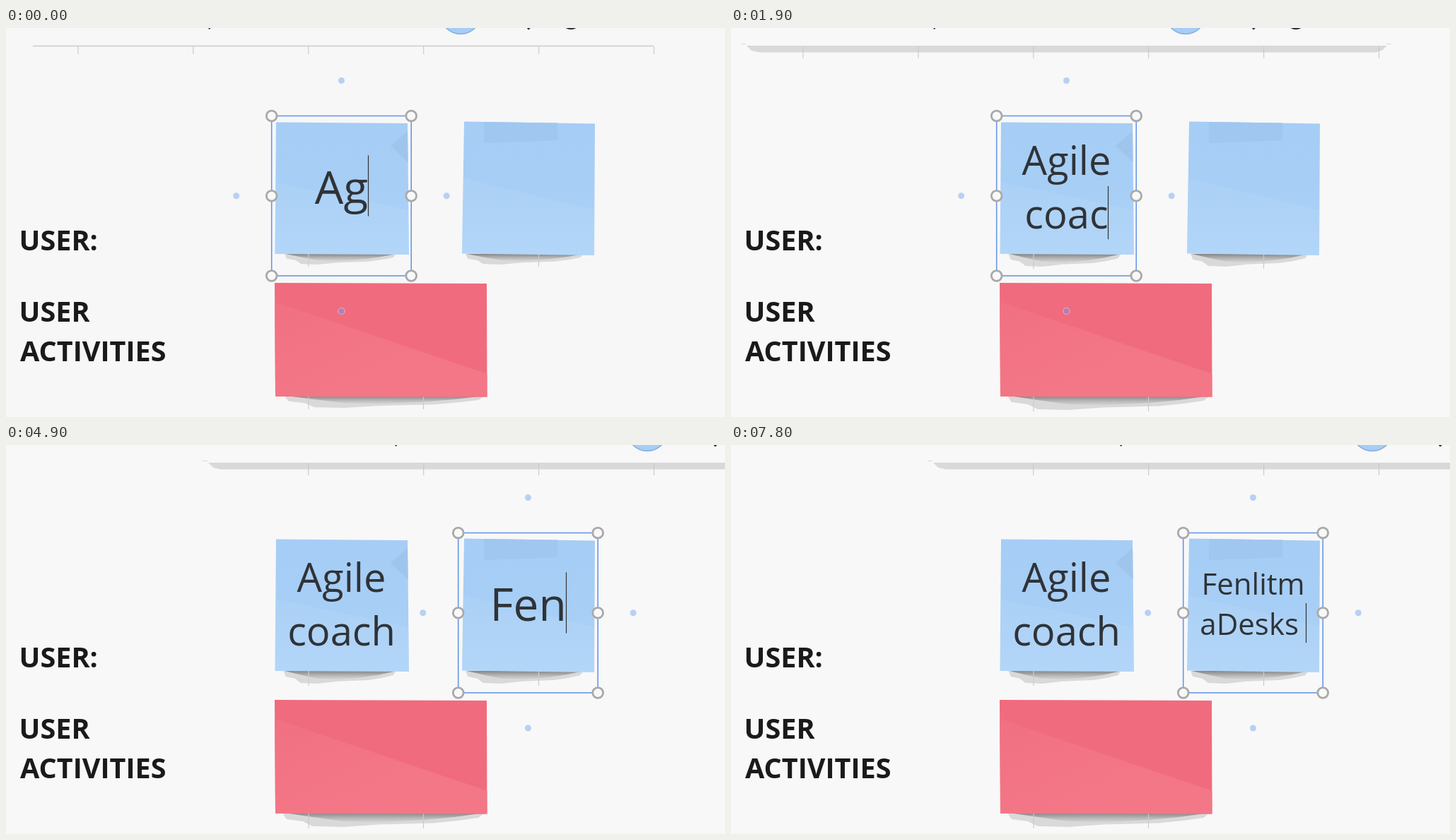
An HTML page with a canvas that plays this animation: 1017 by 551 pixels, repeating every 8 s.

```html
<!DOCTYPE html>
<html lang="en">
<head>
<meta charset="utf-8">
<title>Sticky notes</title>
<style>
html, body { margin: 0; width: 100%; height: 100%; overflow: hidden; background: #f8f8f8; }
canvas { display: block; width: 1017px; height: 551px; }
</style>
</head>
<body>
<canvas id="stage" width="1017" height="551"></canvas>
<script>
const ctx = document.getElementById('stage').getContext('2d');
const LOOP = 8000;
const LINE = 1.362, ASCENT = 1.069, MIDDLE = 224;
const INK = '#2f3337', BLUE_DOT = '#b8d0f4';
const SECOND = 264; // distance between the two blue notes

// [start, lines, font size, caret, top of the text block if not centred]
const firstNote = [
  [0, ['Ag'], 64, 1],
  [100, ['Agi'], 64, 1],
  [200, ['Agil'], 64, 1],
  [400, ['Agile'], 64, 1],
  [700, ['Agile '], 59, 1],
  [900, ['Agile', 'c'], 56, 1],
  [1000, ['Agile', 'co'], 56, 1],
  [1200, ['Agile', 'coa'], 56, 1],
  [1500, ['Agile', 'coac'], 56, 1],
  [2000, ['Agile', 'coac'], 56, 0],
  [2500, ['Agile', 'coac'], 56, 1],
  [2900, ['Agile', 'coach'], 56, 1],
  [3400, ['Agile', 'coach'], 56, 0]
];
const secondNote = [
  [0, [''], 64, 0],
  [4100, [''], 64, 1],
  [4400, ['F'], 64, 1],
  [4600, ['Fe'], 64, 1],
  [4900, ['Fen'], 64, 1],
  [5300, ['Fenl'], 64, 1],
  [5800, ['Fenli'], 64, 1],
  [6100, ['Fenlit'], 57, 1],
  [6400, ['Fenlitm'], 42, 1, 186],
  [6900, ['Fenlitm'], 42, 0, 186],
  [7300, ['Fenlitm'], 42, 1, 186],
  [7500, ['Fenlitm', 'aD'], 42, 1],
  [7600, ['Fenlitm', 'aDes'], 42, 1],
  [7700, ['Fenlitm', 'aDesks'], 42, 1],
  [7800, ['Fenlitm', 'aDesks '], 42, 1]
];

function poly(points, fill) {
  ctx.beginPath();
  points.forEach(([x, y]) => ctx.lineTo(x, y));
  ctx.closePath();
  ctx.fillStyle = fill;
  ctx.fill();
}

function line(x1, y1, x2, y2, color, width = 1) {
  ctx.beginPath();
  ctx.moveTo(x1, y1);
  ctx.lineTo(x2, y2);
  ctx.strokeStyle = color;
  ctx.lineWidth = width;
  ctx.stroke();
}

function circle(x, y, r, fill, stroke, width = 1) {
  ctx.beginPath();
  ctx.arc(x, y, r, 0, Math.PI * 2);
  if (fill) { ctx.fillStyle = fill; ctx.fill(); }
  if (stroke) { ctx.strokeStyle = stroke; ctx.lineWidth = width; ctx.stroke(); }
}

function gradient(x1, y1, x2, y2, ...colors) {
  const g = ctx.createLinearGradient(x1, y1, x2, y2);
  colors.forEach((c, i) => g.addColorStop(i / (colors.length - 1), c));
  return g;
}

function tick(x, top, bottom) {
  line(x, top, x, bottom, '#cbcbcb', 1.2);
}

function shadow(left, right, y, depth) {
  const width = right - left;
  const at = (u, v) => [left + width * u, y + depth * v];
  poly([at(0, 0), at(.02, .45), at(.1, .6), at(.15, .95), at(.3, 1), at(.48, .82),
    at(.75, .72), at(.87, .55), at(.97, .35), at(1, 0)], '#d9d9d9');
  poly([at(.01, 0), at(.15, .3), at(.3, .6), at(.48, .68), at(.7, .5), at(.85, .3), at(1, 0)],
    gradient(0, y, 0, y + depth * .7, '#858585', '#b5b5b5', '#d9d9d9'));
}

function note(corners, fill, sheen, sheenColor) {
  poly(corners, fill);
  ctx.save();
  ctx.beginPath();
  corners.forEach(([x, y]) => ctx.lineTo(x, y));
  ctx.clip();
  poly(sheen, sheenColor);
  ctx.restore();
}

function board(late) {
  const extra = late ? 3 : 0;
  const blue = gradient(0, 134, 0, 321, '#a6cdf5', '#a7cef5', '#afd4f7');

  shadow(394 - extra / 2, 552, 320, 15 + extra);
  shadow(650, 817, 320, 15 + extra);
  shadow(394 - extra, 677, 521, 17 + extra);
  [428, 753.5].forEach(x => tick(x, 320, 338 + extra));
  [428, 590.5].forEach(x => tick(x, 522, late ? 543 : 540));

  note([[382, 133.5], [568, 135], [570, 321], [380.5, 320]], blue,
    [[380, 218], [570, 258], [571, 322], [380, 322]], 'rgba(190,220,250,.2)');
  poly([[544, 167], [568, 146], [568.7, 190]], '#9fc5ed');

  note([[648, 132.5], [833, 135.5], [832, 322], [645, 319.5]], blue,
    [[644, 212], [833, 258], [833, 323], [644, 323]], 'rgba(190,220,250,.2)');
  poly([[676, 133], [780, 134.5], [780.5, 159], [740, 161], [676, 163]], '#a0c7f0');

  note([[380, 361], [680, 362], [680.5, 522.5], [381, 522]], '#f06b7e',
    [[380, 388], [681, 490], [681, 523], [380, 523]],
    gradient(380, 400, 440, 530, '#f17183', '#f37787'));
}

function labels() {
  ctx.font = 'bold 39.6px "Open Sans", sans-serif';
  ctx.fillStyle = '#1a1a1a';
  ctx.fillText('USER:', 18.5, 315);
  ctx.fillText('USER', 18.5, 416);
  ctx.fillText('ACTIVITIES', 20, 471.5);
}

function toolbar(dx, late) {
  ctx.save();
  ctx.translate(dx, 0);
  if (late) {
    poly([[22, 25], [928, 25], [922, 31], [912, 34.5], [40, 34.5], [29, 32]], '#d9d9d9');
    line(14, 22.5, 21, 22.5, '#d9d9d9');
    line(927, 22.5, 934, 22.5, '#d9d9d9');
  } else {
    line(38, 25.5, 916, 25.5, '#cbcbcb', 1.3);
  }
  line(289, -1, 287, 1.5, INK, 2);
  circle(643, -20, 28.5, '#a6cdf5', '#86add9', 1.4);
  line(742, -2, 738, 1.5, INK, 3);
  ctx.beginPath();
  ctx.ellipse(799, -5, 9, 6, 0, 0, Math.PI);
  ctx.strokeStyle = INK;
  ctx.lineWidth = 2.5;
  ctx.stroke();
  ctx.restore();

  for (let i = 0; i < 6; i++) {
    const x = 102 + i * 162.9;
    if (x > dx + 25) tick(x, 26, late ? 43 : 37);
  }
}

function selection(dx) {
  const left = 375.7 + dx, right = 573.2 + dx, top = 124.5, bottom = 351;
  const center = (left + right) / 2, middle = 237.8;
  ctx.strokeStyle = '#6796e8';
  ctx.lineWidth = 1.6;
  ctx.strokeRect(left, top, right - left, bottom - top);
  for (const x of [left, right])
    for (const y of [top, middle, bottom]) circle(x, y, 7.4, '#f8f8f8', '#a9a9a9', 2.8);

  circle(center, 74.5, 4.5, BLUE_DOT);
  circle(left - 50, middle, 4.5, BLUE_DOT);
  circle(right + 50, middle, 4.5, BLUE_DOT);
  if (dx) circle(center, 401, 4.5, BLUE_DOT);
  else circle(center, 401, 4.5, '#b57cb6', '#dcaed0', 1.2);
}

function typed(steps, t, center) {
  const [, lines, size, caret, blockTop] = steps.filter(s => s[0] <= t).pop();
  const top = blockTop || MIDDLE - lines.length * size * LINE / 2;
  ctx.font = `${size}px "Open Sans", sans-serif`;
  lines.forEach((text, i) => {
    const width = ctx.measureText(text).width;
    const y = top + i * size * LINE;
    ctx.fillStyle = INK;
    ctx.fillText(text, center - width / 2, y + size * ASCENT);
    if (caret && i === lines.length - 1) {
      const x = Math.round(center + width / 2 - .7) + .5;
      line(x, y, x, y + size * LINE - 1, '#333', 1.2);
    }
  });
}

function pointer(t) {
  if (t < 3000 || t >= 4300) return;
  const u = Math.min(1, (t - 3000) / 500);
  const ease = u * u * (3 - 2 * u);
  const x = 500 + 235 * ease, y = 262 - 32 * ease;
  if (t >= 3600 && t < 3900) {
    circle(x, y + 1.8, 34, null, 'rgba(255,255,255,.75)', 4.5);
    circle(x, y + 1.8, 34, null, '#000', 2);
  }
  const shape = [[0, 0], [0, 22], [5, 17.5], [9, 26.5], [13, 24.5], [9, 16], [15.5, 16]]
    .map(([a, b]) => [x + a, y + b]);
  poly(shape, '#000');
  ctx.strokeStyle = '#fff';
  ctx.lineWidth = 1.6;
  ctx.stroke();
}

function draw(t) {
  const late = t >= 900;
  const dx = t >= 3900 ? SECOND : 0;
  ctx.fillStyle = late ? '#f8f8f8' : '#f7f7f7';
  ctx.fillRect(0, 0, 1017, 551);
  if (t < 3900 || t >= 4100) toolbar(dx, late);
  labels();
  board(late);
  selection(dx);
  typed(firstNote, t, 474.5);
  typed(secondNote, t, 738.6);
  pointer(t);
}

let start;
function tickFrame(now) {
  if (start === undefined) start = now;
  draw(Math.max(0, now - start) % LOOP);
  requestAnimationFrame(tickFrame);
}
draw(0);
requestAnimationFrame(tickFrame);
</script>
</body>
</html>
```
